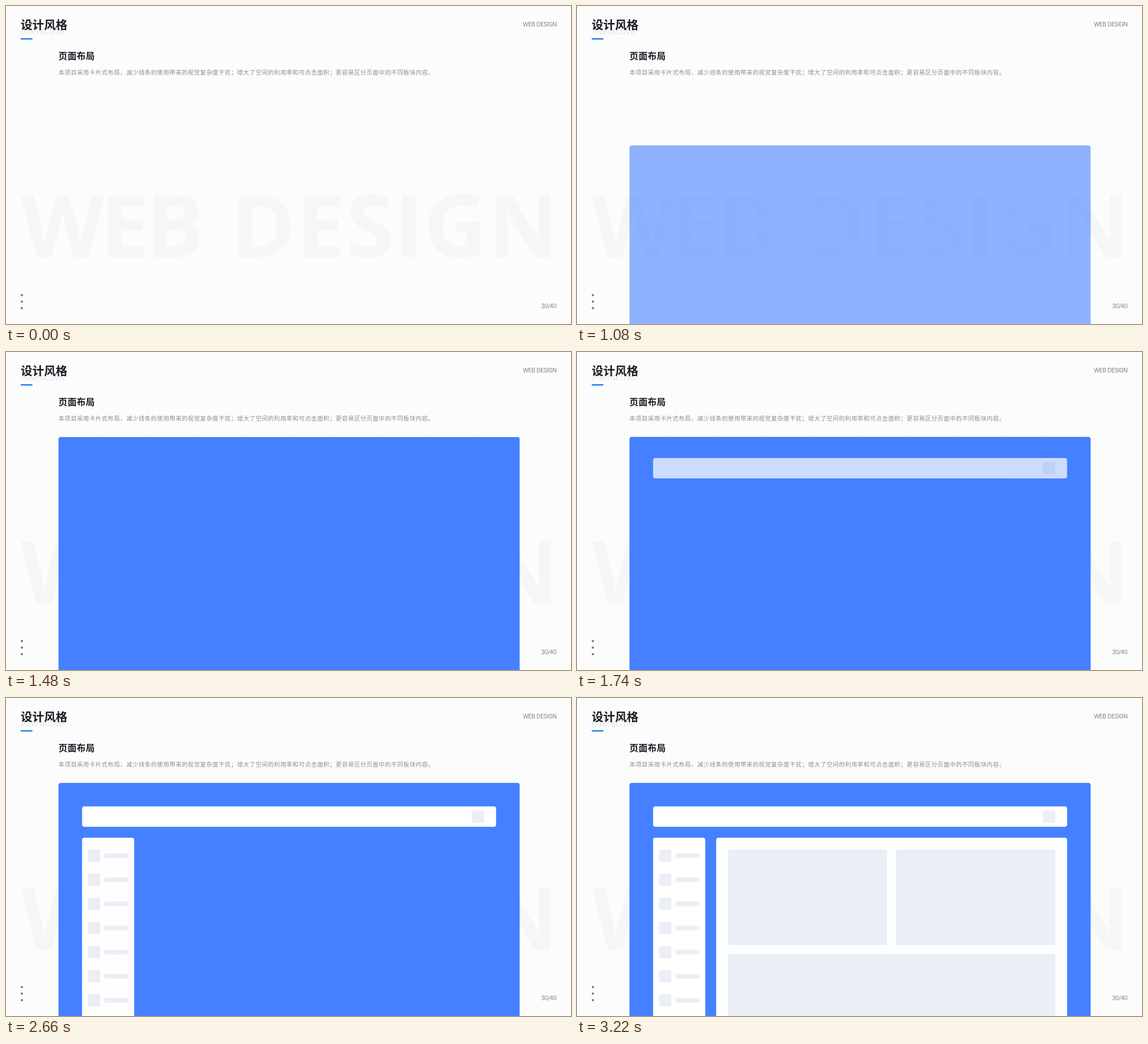
These frames come from a looping animation (997x561 px, 3.5 s). An HTML page:

```html
<!DOCTYPE html>
<html lang="zh-CN">
<head>
<meta charset="utf-8">
<style>
  html, body { margin: 0; width: 100%; height: 100%; overflow: hidden; background: #fcfcfd; }
  svg { display: block; width: 997px; height: 561px; }
  text { font-family: "Noto Sans CJK SC", "Noto Sans CJK", sans-serif; }
  .big { font: 700 153px "Open Sans", sans-serif; fill: #f5f6f8; }
  .ghost { font: 300 16px Inter, sans-serif; fill: #e0e0e2; }
  .head { font-weight: 700; fill: #1b1b24; }
  .body { font-size: 10.4px; letter-spacing: .48px; fill: #8e8e92; }
  .note { font: 400 10.2px Inter, sans-serif; letter-spacing: -.42px; fill: #808084; text-anchor: end; }
</style>
</head>
<body>
<svg viewBox="0 0 997 561">
  <path id="grid" stroke="#f9f9fa"/>
  <text class="big" x="26" y="443" letter-spacing="-6.5">WEB</text>
  <text class="big" x="397.5" y="443" letter-spacing="1.6">DESIGN</text>
  <text class="ghost" x="26" y="50">Interactive</text>
  <text class="head" x="26" y="41.2" font-size="20.6">设计风格</text>
  <rect x="26" y="56.8" width="20.6" height="2.4" fill="#1a78f0"/>
  <text class="head" x="92.6" y="94.2" font-size="15.7" letter-spacing=".4">页面布局</text>
  <text class="body" x="92.6" y="120.8">本项目采用卡片式布局，减少线条的使用带来的视觉复杂度干扰；增大了空间的利用率和可点击面积；更容易区分页面中的不同板块内容。</text>
  <text class="note" x="971.5" y="36">WEB DESIGN</text>
  <text class="note" x="971.5" y="532.5">30/40</text>
  <g fill="#77777b">
    <circle cx="28" cy="510" r="2"/><circle cx="28" cy="521.5" r="2"/><circle cx="28" cy="533" r="2"/>
  </g>
  <g id="layers"></g>
</svg>
<script>
const BLUE = '#4480ff', WHITE = '#fff', GREY = '#eceff5';
const LOOP = 3500, FIRST = 940, STEP = 600, LEAD = 18, DURATION = 620;
const COLUMNS = 12;

const box = (x, y, w, h, fill, r = 4) =>
  `<rect x="${x}" y="${y}" width="${w}" height="${h}" rx="${r}" fill="${fill}"/>`;

const menu = Array.from({ length: 7 }, (_, i) => {
  const y = 267.3 + i * 42.5;
  return box(144.6, y, 22, 22, GREY) + box(173.6, y + 6.8, 42.5, 8.4, GREY, 2.5);
}).join('');

// Each layer slides in from (dx, dy) while fading in.
const layers = [
  { dx: 0, dy: 234, html: box(92.6, 149.7, 813.8, 440, BLUE) },
  { dx: 0, dy: -15.8, html: box(134.3, 191.3, 730.5, 36, WHITE) + box(822, 198.3, 22, 22, GREY) },
  { dx: -26, dy: 0, html: box(134.3, 246.4, 92, 340, WHITE) + menu },
  { dx: 0, dy: 26, html: box(245.6, 246.4, 619.2, 340, WHITE) +
      box(266.4, 267.3, 280.8, 168.2, GREY) + box(562.7, 267.3, 281.3, 168.2, GREY) +
      box(266.4, 451.2, 577.6, 140, GREY) },
];

const columnLine = (_, i) => `M${Math.floor((i + 1) * 997 / COLUMNS) + .5} 0V561`;
document.getElementById('grid').setAttribute('d',
  Array.from({ length: COLUMNS - 1 }, columnLine).join(''));

const root = document.getElementById('layers');
root.innerHTML = layers.map(l => `<g>${l.html}</g>`).join('');

function draw(now) {
  const t = now % LOOP;
  layers.forEach(({ dx, dy }, i) => {
    const age = t - FIRST - i * STEP;
    const left = age < 0 ? 1 : Math.max(0, 1 - (age + LEAD) / DURATION) ** 3;
    const g = root.children[i];
    g.setAttribute('opacity', 1 - left);
    g.setAttribute('transform', `translate(${dx * left} ${dy * left})`);
  });
}

const start = performance.now();
function tick() {
  draw(performance.now() - start);
  requestAnimationFrame(tick);
}
tick();
</script>
</body>
</html>
```
